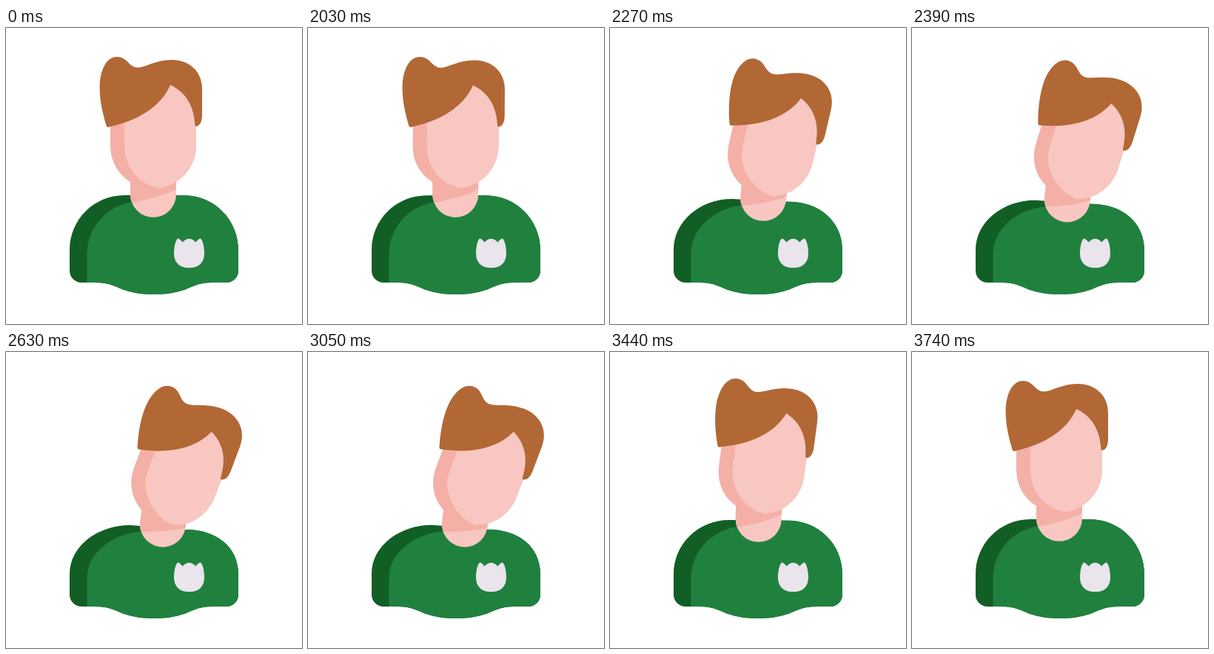
Write an HTML page that moves like this. It is 400 px wide and 400 px high and loops after 3770 ms.

```html
<!DOCTYPE html>
<html lang="en">
<head>
<meta charset="utf-8">
<title>Head tilt</title>
<style>
html, body { margin: 0; height: 100%; overflow: hidden; background: #fff; }
svg { display: block; width: 100%; height: 100%; }
</style>
</head>
<body>
<svg viewBox="0 0 400 400">
  <clipPath id="shirtClip"><path class="shirt"/></clipPath>
  <clipPath id="neckClip"><path class="neck"/></clipPath>
  <path class="shirt" fill="#125f25"/>
  <path class="front" fill="#20813f" clip-path="url(#shirtClip)"/>
  <path fill="#eae4ec" d="M227 305C227 296 229 287 232 284.500C234 284 236.500 287 238.500 289.500Q247.500 280 256.500 289.500C258.500 287 261 284 263 284.500C266 287 268 296 268 305C268 317 260 324 249 324H246C235 324 227 317 227 305Z"/>
  <path class="neck" fill="#f8c7c1"/>
  <path class="shade" fill="#f4b0a7" clip-path="url(#neckClip)"/>
  <g class="head">
    <path fill="#f4b0a7" d="M141 75V158C141 181 152 199 170 209C182 214 195 217 209 216C236 211 257 188 257 158V75Z"/>
    <path class="face" fill="#f8c7c1"/>
    <path fill="#b16835" d="M138 134C136.500 134.300 136 133 135.300 131C130.300 114 126.400 97 126.600 79C127 58 135 39 150 39C164 39 166 53 178 53.500C189 53 203 43 224 43C248 43 265 59 265 82V117C265 125 263 132 257 133C255.500 133 255.300 131 255 127C253 102 240 85 222 77C210 105 180 125 138 134Z"/>
  </g>
</svg>
<script>
const LOOP = 3770;
const parts = name => document.querySelectorAll('.' + name);
const draw = (name, d) => parts(name).forEach(el => el.setAttribute('d', d));
const head = parts('head')[0];

// Cubic Bezier easing with control points (a, 0) and (b, 1)
function ease(x, a, b) {
  if (x <= 0 || x >= 1) return x <= 0 ? 0 : 1;
  let lo = 0, hi = 1, s;
  for (let i = 0; i < 24; i++) {
    s = (lo + hi) / 2;
    const at = 3 * a * s * (1 - s) ** 2 + 3 * b * s * s * (1 - s) + s ** 3;
    if (at < x) lo = s; else hi = s;
  }
  return s * s * (3 - 2 * s);
}

function pose(p, turn) {
  const leftX = 160 + 8 * p, leftY = 226 + 8 * p;
  const rightX = 240 + 3 * p, rightY = 226 + 14 * p;
  draw('shirt', `M${leftX} ${leftY}L${rightX} ${rightY}
    C${281 + 3 * p} ${rightY} 314 ${259 + 4 * p} 314 300V328A16 16 0 0 1 298 344
    H279C260 344 251 350 242 353.5C228 358 216 360 200 360
    C184 360 172 358 158 353.5C149 350 140 344 121 344
    H102A16 16 0 0 1 86 328V300C86 ${259 + 3 * p} ${119 + 5 * p} ${leftY} ${leftX} ${leftY}Z`);

  const foldY = 234 + 8 * p;
  draw('front', `M109.5 400V306C109.5 ${266 + 3 * p} ${142 + 6 * p} ${foldY} ${183 + 10 * p} ${foldY}
    V200H330V400Z`);

  const neckL = 168 + 13 * p, neckR = neckL + 62, neckY = 224.5 + 8 * p;
  draw('neck', `M${168 + 18 * p} 195L${neckL} ${neckY}A31 31.3 0 0 0 ${neckR} ${neckY}L${230 + 18 * p} 195Z`);

  const shadeL = 236 + 7 * p, shadeR = 218 + 8 * p + 12 * p * turn;
  draw('shade', `M${neckL - 5} 190V${shadeL}H${neckL}
    Q${neckL + 38} ${(shadeL + shadeR) / 2 + 3} ${neckR} ${shadeR}H${neckR + 10}V190Z`);

  // The chin shadow widens as the head turns
  draw('face', `M160 75V158C160 ${190 - 4 * turn} ${182 + 7 * turn} ${214 - turn} ${209 + 9 * turn} ${216 - 2.5 * turn}
    C${236 + 5 * turn} ${211 - 6 * turn} 257 ${188 - 3.5 * turn} 257 158V75Z`);
  head.setAttribute('transform', `translate(${21.2 * p} ${16.2 * p}) rotate(${20.7 * turn} 199 180)`);
}

function frame() {
  const t = performance.now() % LOOP;
  const lean = ease((t - 2000) / 700, 0.2, 0.29);
  const rise = ease((t - 3020) / 700, 0.2, 0.29);
  const unturn = ease((t - 3020) / 730, 0.53, 0.5);
  pose(lean - rise, lean - unturn);
  requestAnimationFrame(frame);
}
frame();
</script>
</body>
</html>
```
